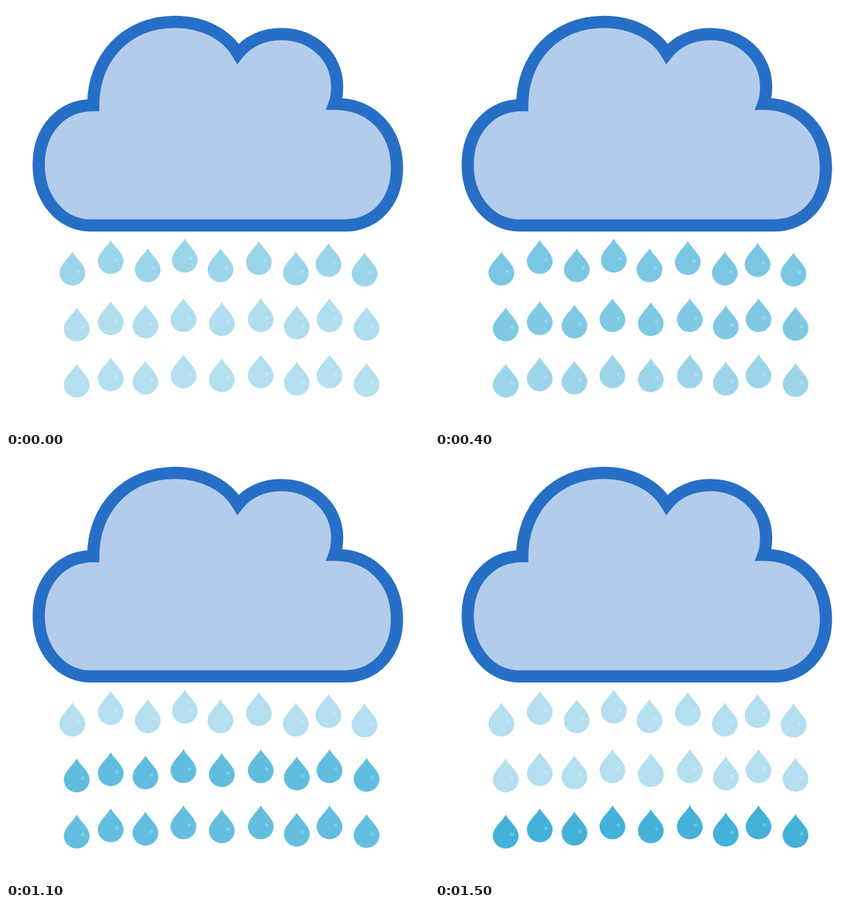
Animation of 640x640 px, one loop 1600 ms. Source, as an HTML page:

```html
<!DOCTYPE html>
<html lang="en">
<head>
<meta charset="utf-8">
<title>Rain cloud</title>
<style>
  html, body { margin: 0; height: 100%; overflow: hidden; background: #fff; }
  svg { display: block; width: 100vw; height: 100vh; }
</style>
</head>
<body>
<svg viewBox="0 0 640 640">
  <defs>
    <g id="drop">
      <path fill="#44b1d9" d="M0 0C5 10 19.5 20 19.5 32A19.5 19.5 0 0 1-19.5 32C-19.5 20-5 10 0 0Z"/>
      <circle cx="9" cy="30" r="2.8" fill="#fff" opacity=".2"/>
    </g>
  </defs>
  <path fill="#b4cceb" stroke="#276fc6" stroke-width="18.5" d="M128 332C83 332 49.5 292 49.5 240C49.5 187 84 150 132 150
    C132 78 182 24 256 24C298 24 334 43 351 72C366 53 390 42.5 416 42.5C466 42.5 501 78 501 122
    C501 131 500 140 497 148C555 148 591.5 190 591.5 245C591.5 295 560 332 512 332Z"/>
  <g id="rain"></g>
</svg>
<script>
const LOOP = 1600, STEP = 100, DIM = 0.4;
const rain = document.getElementById('rain');

const upperX = [100.5, 158.5, 214.5, 270.5, 324.5, 382.5, 438.5, 488, 542.5];
const upperY = [371.5, 354, 366.5, 352, 366.5, 355.5, 371.5, 358.5, 373];
const lowerX = [107, 158.5, 211, 268.5, 326.5, 385.5, 440, 489.5, 545.5];
const lowerY = [456, 446.5, 451.5, 442, 448, 442, 453, 442, 455];

// Each row brightens from start to peak, holds, then fades out by end.
const rows = [
  { xs: upperX, ys: upperY, dy: 0, start: -50, peak: 180, hold: 210, end: 600 },
  { xs: lowerX, ys: lowerY, dy: 0, start: -30, peak: 900, hold: 1000, end: 1380 },
  { xs: lowerX, ys: lowerY, dy: 85, start: 110, peak: 1500, hold: 1600, end: 1601 },
];

for (const row of rows) {
  const drops = row.xs.map((x, i) => `<use href="#drop" x="${x}" y="${row.ys[i] + row.dy}"/>`);
  rain.insertAdjacentHTML('beforeend', `<g>${drops.join('')}</g>`);
  row.group = rain.lastElementChild;
}

function draw() {
  const t = Math.floor(performance.now() % LOOP / STEP) * STEP;
  for (const { group, start, peak, hold, end } of rows) {
    const level = Math.min(1, (t - start) / (peak - start), (end - t) / (end - hold));
    group.setAttribute('opacity', DIM + (1 - DIM) * Math.max(0, level));
  }
  requestAnimationFrame(draw);
}
draw();
</script>
</body>
</html>
```
